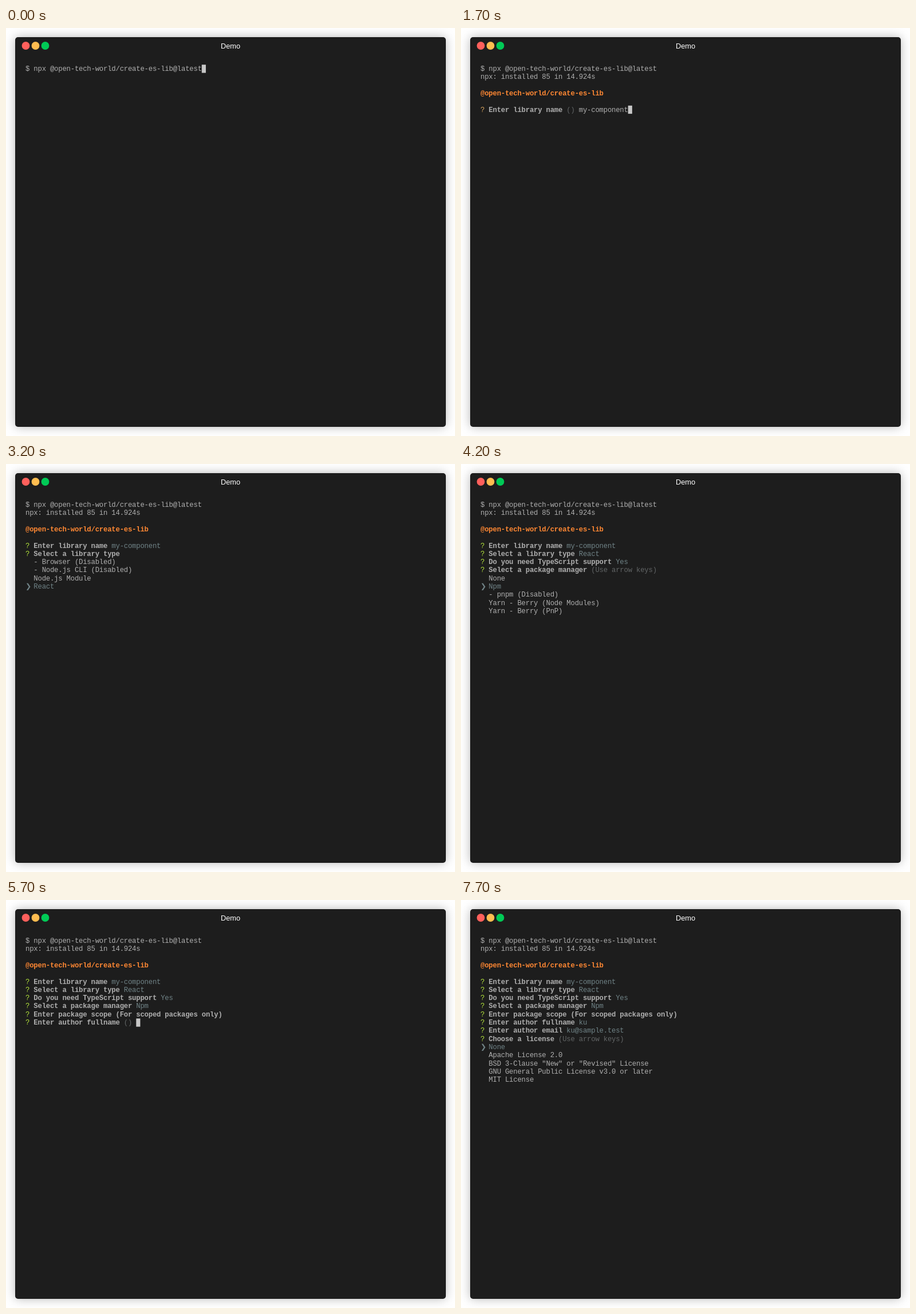
An HTML page that plays this animation: 784x714 px, repeating every 8000 ms.

```html
<!DOCTYPE html>
<html lang="en">
<head>
<meta charset="utf-8">
<title>Demo</title>
<style>
  html, body { margin: 0; width: 100%; height: 100%; overflow: hidden; background: #fff; }
  .window {
    position: absolute; left: 16px; top: 16px; width: 752px; height: 682px;
    border-radius: 5px; background: #1d1d1d; box-shadow: 0 0 18px rgba(0, 0, 0, .28);
  }
  svg { position: absolute; left: 0; top: 0; }
  .title { font: 12.8px "Liberation Sans", Arial, sans-serif; fill: #fff; text-anchor: middle; }
  #screen { font: 12.27px "Liberation Mono", "DejaVu Sans", monospace; }
  .text, .bold { fill: #afafaf; }
  .bold, .head { font-weight: bold; }
  .head { fill: #ff8833; }
  .mark { fill: #b3e33b; }
  .first { fill: #d8a55f; }
  .cyan { fill: #708387; }
  .dim { fill: #626566; }
  .cursor { fill: #c7c7c7; }
</style>
</head>
<body>
<div class="window"></div>
<svg width="784" height="714" viewBox="0 0 784 714">
  <circle cx="34.5" cy="31" r="6.9" fill="#ff605c"/>
  <circle cx="51.5" cy="31" r="6.9" fill="#ffbd50"/>
  <circle cx="68.5" cy="31" r="6.9" fill="#00ca56"/>
  <text class="title" x="392" y="35.5">Demo</text>
  <g id="screen"></g>
</svg>
<script>
const LOOP = 8000;
const LEFT = 34, TOP = 64.2, CELL = 7.158, ROW = 14.32, BASE = 10.7;
const screen = document.getElementById('screen');

// A row is a list of [style, text] parts, set one column apart.
const text = s => [['text', s]];
const done = (question, answer) => [['mark', '?'], ['bold', question], ['cyan', answer]];
const ask = (question, hint, typed = '', mark = 'mark') =>
  [[mark, '?'], ['bold', question], ['dim', hint], ['text', typed]];
const list = (items, chosen) => items.map((item, i) =>
  i === chosen ? [['cyan', '❯'], ['cyan', item]] : [['text', ' '], ['text', item]]);

const ARROWS = '(Use arrow keys)';
const NAME = 'Enter library name';
const TYPE = 'Select a library type';
const TYPESCRIPT = 'Do you need TypeScript support';
const MANAGER = 'Select a package manager';
const SCOPE = 'Enter package scope (For scoped packages only)';
const AUTHOR = 'Enter author fullname';
const EMAIL = 'Enter author email';
const USER = 'ku', ADDRESS = 'ku@sample.test';

const types = ['- Browser (Disabled)', '- Node.js CLI (Disabled)', 'Node.js Module', 'React'];
const managers = ['None', 'Npm', '- pnpm (Disabled)', 'Yarn - Berry (Node Modules)', 'Yarn - Berry (PnP)'];
const licenses = ['None', 'Apache License 2.0', 'BSD 3-Clause "New" or "Revised" License',
  'GNU General Public License v3.0 or later', 'MIT License'];

const command = [text('$ npx @open-tech-world/create-es-lib@latest')];
const installed = [...command, text('npx: installed 85 in 14.924s')];
const intro = [...installed, [], [['head', '@open-tech-world/create-es-lib']], []];
const answers = [
  done(NAME, 'my-component'), done(TYPE, 'React'), done(TYPESCRIPT, 'Yes'),
  done(MANAGER, 'Npm'), done(SCOPE, ''), done(AUTHOR, USER), done(EMAIL, ADDRESS)
];
const after = (count, ...rows) => [...intro, ...answers.slice(0, count), ...rows];

// Each scene: start time, rows, cursor shown at the end of the last row.
const scenes = [
  [0, command, true],
  [100, [...command, text('')], true],
  [200, [...installed, text('')], true],
  [700, after(0, ask(NAME, '()', '', 'first')), true],
  [1200, after(0, ask(NAME, '()', 'my-', 'first')), true],
  [1700, after(0, ask(NAME, '()', 'my-component', 'first')), true],
  [2200, after(1, ask(TYPE, ARROWS), ...list(types, 2)), false],
  [3200, after(1, ask(TYPE, ''), ...list(types, 3)), false],
  [3700, after(2, ask(TYPESCRIPT, '(Y/n)')), true],
  [4200, after(3, ask(MANAGER, ARROWS), ...list(managers, 1)), false],
  [5200, after(4, ask(SCOPE, '()')), true],
  [5700, after(5, ask(AUTHOR, '()')), true],
  [6200, after(5, ask(AUTHOR, '()', USER)), true],
  [6700, after(6, ask(EMAIL, '()')), true],
  [7200, after(6, ask(EMAIL, '()', ADDRESS)), true],
  [7700, after(7, ask('Choose a license', ARROWS), ...list(licenses, 0)), false]
];

function add(tag, attrs, content = '') {
  const node = document.createElementNS('http://www.w3.org/2000/svg', tag);
  for (const key in attrs) node.setAttribute(key, attrs[key]);
  node.textContent = content;
  screen.append(node);
}

const cellX = col => LEFT + col * CELL;
const rowY = row => TOP + row * ROW;

// Every character sits in its own terminal cell.
function addText(style, str, col, row) {
  const x = [...str].map((_, i) => cellX(col + i).toFixed(2)).join(' ');
  add('text', { class: style, x, y: rowY(row) + BASE }, str);
}

function draw([, rows, hasCursor]) {
  screen.replaceChildren();
  let end = 0;
  rows.forEach((parts, row) => {
    let col = 0;
    for (const [style, str] of parts) {
      if (str.trim()) addText(style, str, col, row);
      end = col + str.length;
      col = end + 1;
    }
  });
  if (hasCursor) {
    add('rect', { class: 'cursor', x: cellX(end), y: rowY(rows.length - 1), width: CELL, height: ROW });
  }
}

let shown;
function render(time) {
  const t = time % LOOP;
  const scene = scenes.findLast(([start]) => start <= t);
  if (scene !== shown) draw(shown = scene);
}

render(0);
const begin = performance.now();
function tick() {
  render(performance.now() - begin);
  requestAnimationFrame(tick);
}
requestAnimationFrame(tick);
</script>
</body>
</html>
```
